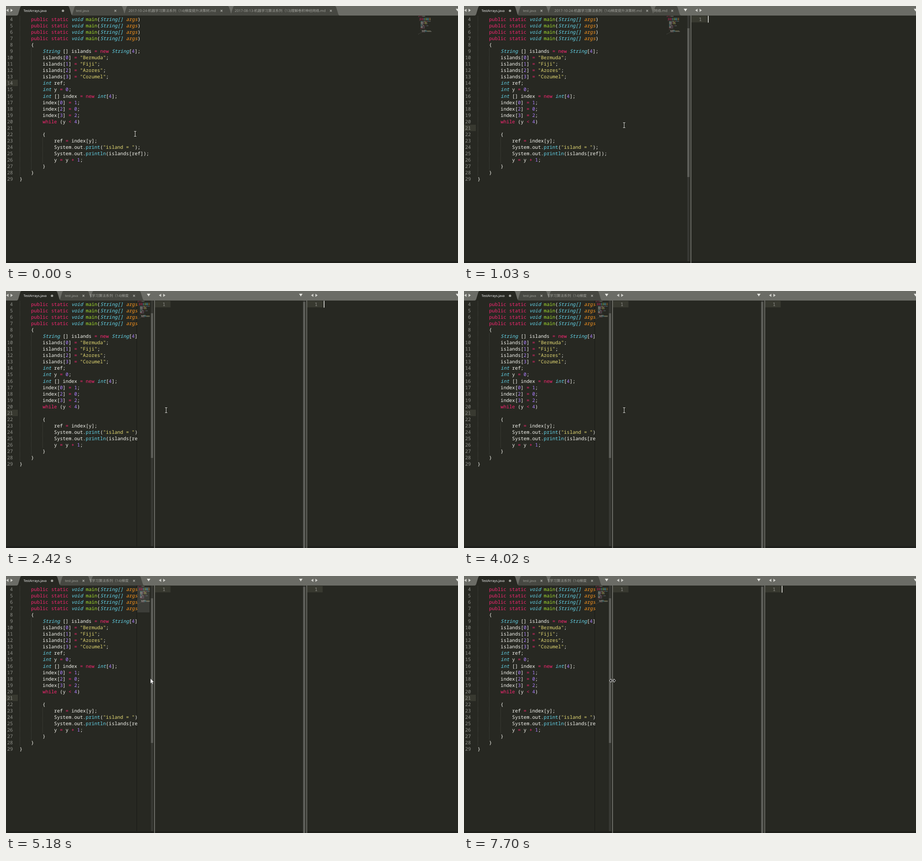
Write an HTML page with a canvas that moves like this. It is 992 px wide and 565 px high and loops after 8000 ms.

```html
<!DOCTYPE html>
<html lang="en">
<head>
<meta charset="utf-8">
<title>Editor panes</title>
<style>
html, body { margin: 0; height: 100%; overflow: hidden; background: #272822; }
canvas { display: block; }
</style>
</head>
<body>
<canvas id="stage" width="992" height="565"></canvas>
<script>
const ctx = document.getElementById('stage').getContext('2d');
const LOOP = 8000, W = 992, H = 565, BAR = 21;
const COL = 6.316, ROW = 14.06, CODE_X = 29.8, FIRST = 4;
const MONO = '10.53px "Noto Sans Mono", "DejaVu Sans Mono", monospace';
const UI = '"Open Sans", "Noto Sans CJK SC", "Noto Sans CJK", sans-serif';
const BG = '#272822', WHITE = '#f8f8f2', RED = '#f92672', CYAN = '#66d9ef',
  GREEN = '#a6e22e', ORANGE = '#fd971f', YELLOW = '#e6db74', PURPLE = '#ae81ff',
  LIT = '#383930', CHROME = '#6b6c66';

const mainLine = '    public static void main(String[] args)';
const code = [
  'public class TestArrays', '{', '', mainLine, mainLine, mainLine, mainLine,
  '    {',
  '        String [] islands = new String[4];',
  '        islands[0] = "Bermuda";',
  '        islands[1] = "Fiji";',
  '        islands[2] = "Azores";',
  '        islands[3] = "Cozumel";',
  '        int ref;',
  '        int y = 0;',
  '        int [] index = new int[4];',
  '        index[0] = 1;',
  '        index[2] = 0;',
  '        index[3] = 2;',
  '        while (y < 4)',
  '',
  '        {',
  '            ref = index[y];',
  '            System.out.print("island = ");',
  '            System.out.println(islands[ref]);',
  '            y = y + 1;',
  '        }',
  '    }',
  '}'
];

// [pattern, colour, italic]
const rules = [
  [/^"/, YELLOW], [/^(public|static|class|new|while|[=<+])$/, RED],
  [/^(void|int|String(\[\])?)$/, CYAN, true], [/^print(ln)?$/, CYAN],
  [/^main$/, GREEN], [/^args$/, ORANGE, true], [/^\d$/, PURPLE], [/./, WHITE]
];
const tokens = code.flatMap((line, i) =>
  [...line.matchAll(/"[^"]*"|String\[\]|\w+|[^\s\w]/g)].map(m => {
    const [, color, italic] = rules.find(r => r[0].test(m[0]));
    return { text: m[0], col: m.index, line: i + 1, color, italic };
  }));

const boost = '2017-10-24-机器学习算法系列（14)梯度提升决策树.md';
const conv = '2017-08-13-机器学习算法系列（13)理解卷积神经网络.md';
// tab: [left, right, label, label x, close x, clip left, clip right]
const layouts = [
  {
    start: 0, clip: W, map: 905, dot: 125, active: 147,
    tabs: [[142, 264, 'test.java', 153.5, 240], [256, 498, boost, 269, 473],
      [490, 733, conv, 502, 713]],
    arrows: [3], menus: [991], bars: [], panes: []
  },
  {
    start: 1030, clip: 489, map: 445, dot: 101, active: 121,
    tabs: [[115, 190, 'test.java', 129.5, 170], [181, 419, boost, 198.5, 402],
      [411, 477, '网络.md', 417, 457]],
    arrows: [3, 510], menus: [486, 991], bars: [[490, 49, 376]], panes: [499]
  },
  {
    start: 2420, clip: 288, map: 289, dot: 101, active: 121,
    tabs: [[115, 190, 'test.java', 129.5, 170],
      [181, 304, boost, 130, 281, 183, 269.5]],
    arrows: [3, 338, 672], menus: [313, 647, 991],
    bars: [[318, 49, 367], [652, 24, H]], panes: [327, 661]
  }
];

// [time, opacity]
const caretSteps = [
  [0, 0], [270, 1], [790, .5], [910, 0], [1030, 1], [1430, .5], [1590, 0],
  [2020, .5], [2170, 1], [2810, .6], [2930, .2], [3080, 0], [3480, .5],
  [3600, 1], [3870, .5], [4020, 0], [4550, .5], [4670, 1], [4910, .5],
  [5030, 0], [5450, .5], [5570, 1], [6000, .5], [6150, 0], [6610, 1],
  [7030, 0], [7550, .6], [7700, 1]
];
// [time, shape, x, y]
const mouseSteps = [
  [0, beam, 283.5, 281], [150, beam, 351.5, 262], [4550, beam, 346.5, 262],
  [4670, beam, 338.5, 252], [4790, arrow, 312, 238], [4910, arrow, 314, 231],
  [5030, arrow, 316, 227], [5180, arrow, 317, 225], [5300, arrow, 318, 224],
  [6880, resize, 326, 231], [7550, resize, 326, 230]
];
const at = (steps, t) => steps.findLast(s => s[0] <= t);
const rowY = line => 29 + (line - FIRST) * ROW;

function rect(color, x, y, w, h) {
  ctx.fillStyle = color;
  ctx.fillRect(x, y, w, h);
}

function text(str, x, y, color, font) {
  ctx.font = font;
  ctx.fillStyle = color;
  ctx.fillText(str, x, y);
}

function poly(color, ...pts) {
  ctx.fillStyle = color;
  ctx.beginPath();
  for (let i = 0; i < pts.length; i += 2) ctx.lineTo(pts[i], pts[i + 1]);
  ctx.closePath();
  ctx.fill();
}

function stroke(color, path, width = 1) {
  ctx.strokeStyle = color;
  ctx.lineWidth = width;
  ctx.stroke(new Path2D(path));
}

function clipped(x, y, w, h, draw) {
  ctx.save();
  ctx.beginPath();
  ctx.rect(x, y, w, h);
  ctx.clip();
  draw();
  ctx.restore();
}

function beam(x, y) {
  stroke('#d4d4d0', `M${x - 2.5} ${y - 5.5}h5M${x - 2.5} ${y + 5.5}h5M${x} ${y - 5.5}v11`);
}

function arrow(x, y) {
  ctx.save();
  ctx.translate(x, y);
  const shape = 'M0 0V11.5L2.7 9.2L4.5 13.3L6.4 12.4L4.6 8.5H8Z';
  ctx.fillStyle = '#fff';
  ctx.fill(new Path2D(shape));
  stroke('#111', shape, .6);
  ctx.restore();
}

function resize(x, y) {
  const shape = `M${x - 7} ${y}l4 -4v3h6v-3l4 4l-4 4v-3h-6v3Z`;
  ctx.fillStyle = '#111';
  ctx.fill(new Path2D(shape));
  stroke('#f0f0f0', shape, .9);
}

function tabShape(x0, x1, fill) {
  ctx.fillStyle = fill;
  ctx.fill(new Path2D(`M${x0} ${BAR}Q${x0 + 3} ${BAR} ${x0 + 4} 17L${x0 + 8} 4
    Q${x0 + 9} 0 ${x0 + 12} 0H${x1 - 12}Q${x1 - 9} 0 ${x1 - 8} 4
    L${x1 - 4} 17Q${x1 - 3} ${BAR} ${x1} ${BAR}`));
}

function drawTabs(v) {
  rect(CHROME, 0, 0, W, BAR);
  for (const [x0, x1, label, x, close, c0 = x0, c1 = x1] of v.tabs.toReversed()) {
    tabShape(x0, x1, '#474842');
    const size = label === 'test.java' ? 7.35 : 7.74;
    clipped(c0, 0, c1 - c0, BAR, () => text(label, x, 13, '#a0a19b', `${size}px ${UI}`));
    stroke('#a8a9a3', `M${close - 2} 8.5l4 4m0 -4l-4 4`, 1.1);
  }
  tabShape(23, v.active, BG);
  text('TestArrays.java', 38.5, 13, '#fff', `7.25px ${UI}`);
  ctx.fillStyle = '#a0a19b';
  ctx.beginPath();
  ctx.arc(v.dot, 10.5, 2.6, 0, 7);
  ctx.fill();
  for (const x of v.arrows) {
    poly('#d0d0cb', x + 2.5, 6, x + 2.5, 13, x - 2.5, 9.5);
    poly('#d0d0cb', x + 7, 6, x + 7, 13, x + 12, 9.5);
  }
  for (const x of v.menus) poly('#e4e4df', x - 3.8, 6, x + 3.8, 6, x, 12);
}

function drawGutter(t) {
  const line = t < 270 ? 14 : 21;
  rect(LIT, 0, Math.round(rowY(line) - 7.5), 26, 14);
  ctx.textAlign = 'right';
  for (let n = FIRST; n <= code.length; n++) text(n, 15, rowY(n) + 3.8, '#90918b', MONO);
  ctx.textAlign = 'left';
}

function drawCode(t) {
  ctx.setLineDash([1, 1]);
  for (const [col, from, to] of [[0, 4, 28], [4, 9, 27], [8, 23, 26]]) {
    const x = Math.round(CODE_X + col * COL) + .5;
    stroke('#484943', `M${x} ${rowY(from) - 7}V${rowY(to) + 7}`);
  }
  ctx.setLineDash([]);
  for (const k of tokens) {
    if (k.line < FIRST) continue;
    text(k.text, CODE_X + k.col * COL, rowY(k.line) + 3.8, k.color,
      (k.italic ? 'italic ' : '') + MONO);
  }
  if (t >= 270 && t < 1030)
    for (const line of [8, 28]) rect('#d8d8d2', 55, Math.round(rowY(line) + 6), 6, 1);
}

function drawMinimap(x, hover) {
  if (hover) rect('#3c3d38', 288, 24, 27, 56);
  ctx.globalAlpha = .45;
  for (const k of tokens)
    rect(k.color, x + k.col * .643, 22 + (k.line - 1) * 1.4, k.text.length * .643, .95);
  ctx.globalAlpha = 1;
}

function drawPanes(v) {
  for (const [x, top, bottom] of v.bars) {
    rect('#373833', x, BAR, 5, H - BAR - 4);
    rect('#5b5c57', x, top, 5, bottom - top);
  }
  v.panes.forEach(x => {
    rect(CHROME, x - 2, BAR, 2, H - BAR);
    rect(LIT, x, 22, 34, 14);
    text('1', x + 16.5, 32.8, '#90918b', MONO);
  });
}

function draw(t) {
  const v = layouts.findLast(l => l.start <= t);
  const narrow = v.clip < 300;
  ctx.textRendering = 'geometricPrecision';
  rect(BG, 0, 0, W, H);
  rect('#1f201c', 0, 561, W, 4);
  drawGutter(t);
  if (narrow) rect('#1f201b', 286, BAR, 2, H - BAR - 4);
  clipped(0, BAR, v.clip, H, () => drawCode(t));
  clipped(0, BAR, narrow ? 315.5 : W, H,
    () => drawMinimap(v.map, t >= 4910 && t < 5300));
  drawPanes(v);
  drawTabs(v);

  ctx.globalAlpha = at(caretSteps, t)[1];
  if (v.panes.length) rect(WHITE, v.panes.at(-1) + 36.3, 21.5, 1.5, 15);
  else rect(WHITE, 29.3, rowY(21) - 7, 1.5, 14);
  ctx.globalAlpha = 1;

  const [, shape, x, y] = at(mouseSteps, t);
  shape(x, y);
}

const begin = performance.now();
function frame() {
  draw((performance.now() - begin) % LOOP);
  requestAnimationFrame(frame);
}
frame();
</script>
</body>
</html>
```
